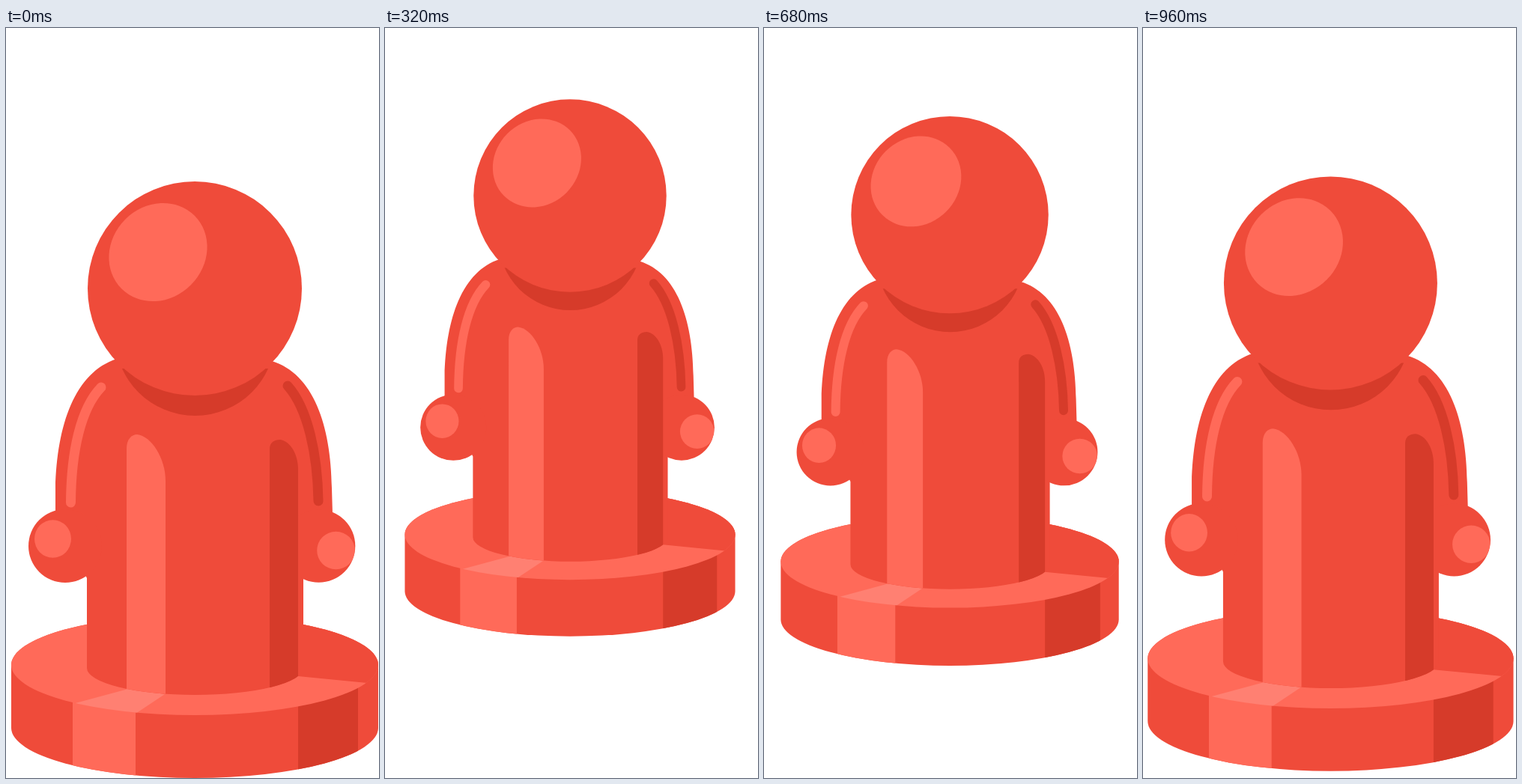
An HTML page with a canvas for the animation above (1000 ms loop, 498x1002 px).

```html
<!DOCTYPE html>
<html lang="en">
<head>
<meta charset="utf-8">
<title>Bouncing pawn</title>
<style>
  html, body { margin: 0; width: 100%; height: 100%; overflow: hidden; background: #fff; }
  canvas { display: block; width: 498px; height: 1002px; }
</style>
</head>
<body>
<canvas id="stage" width="498" height="1002"></canvas>
<script>
const ctx = document.getElementById('stage').getContext('2d');
const STEP = 40, LOOP = 1000;
const RED = '#ef4b3a', LIGHT = '#ff6a59', PALE = '#ff8072', DARK = '#d63b2a';

// The pawn scales about this far point as it hops.
const PIVOT = { x: 202, y: -890 };

// time, scale, x drift, y drift
const KEYS = [
  [0, 1, 0, 0],
  [240, 0.9244, 0, 0],
  [400, 0.8758, 0, -0.5],
  [440, 0.859, 0, -0.5],
  [520, 0.8815, 0, -0.5],
  [680, 0.921, 0, -0.6],
  [800, 0.9523, -0.6, -1.3],
  [960, 0.9965, -1.4, -2.7],
  [1000, 1, 0, 0]
];

function poseAt(time) {
  const i = KEYS.findIndex(key => key[0] > time);
  const a = KEYS[i - 1], b = KEYS[i];
  const u = (time - a[0]) / (b[0] - a[0]);
  return a.slice(1).map((v, n) => v + (b[n + 1] - v) * u);
}

function ellipse(x, y, rx, ry = rx, turn = 0) {
  const p = new Path2D();
  p.ellipse(x, y, rx, ry, turn, 0, Math.PI * 2);
  return p;
}

function rect(x, y, w, h) {
  const p = new Path2D();
  p.rect(x, y, w, h);
  return p;
}

function fill(color, path) {
  ctx.fillStyle = color;
  ctx.fill(path);
}

function line(color, path) {
  ctx.strokeStyle = color;
  ctx.lineWidth = 13;
  ctx.lineCap = 'round';
  ctx.stroke(path);
}

function clipped(path, draw) {
  ctx.save();
  ctx.clip(path);
  draw();
  ctx.restore();
}

const plateTop = ellipse(252, 851, 245, 67);
const plate = new Path2D('M7 851A245 67 0 0 1 497 851V935A245 67 0 0 1 7 935Z');
const body = new Path2D(
  'M66 650V615C68 530 92 460 148 442L355 445C410 462 434 530 435 615L436 650' +
  'L397 735V855A144.5 36 0 0 1 108 855V735Z');
const bodyLight = new Path2D('M161 900V562C161 549 168 543 175 543C194 545 213 575 213 605V900Z');
const bodyDark = new Path2D('M352 900V562C352 554 358 550 366 550C380 552 390 570 390 590V900Z');
const armLight = new Path2D('M86.5 634C87 565 100 508 127 480');
const armDark = new Path2D('M376 478C403 508 416 570 417 632');
const castShadow = new Path2D('M390 866L482 875L498 875V780H390Z');
const topGlint = new Path2D('M89 903L163 883L212 890L173 916V925H89Z');
const leftHand = ellipse(79, 692, 49);
const rightHand = ellipse(417.5, 692, 48.8);

function drawPlate() {
  fill(RED, plate);
  clipped(plate, () => {
    fill(LIGHT, rect(89, 851, 84, 160));
    fill(DARK, rect(390, 851, 80, 160));
  });
  fill(LIGHT, plateTop);
  clipped(plateTop, () => {
    fill(RED, castShadow);
    fill(PALE, topGlint);
  });
}

function drawBody() {
  [body, leftHand, rightHand].forEach(p => fill(RED, p));
  clipped(body, () => {
    fill(LIGHT, bodyLight);
    fill(DARK, bodyDark);
  });
  line(LIGHT, armLight);
  line(DARK, armDark);
  fill(LIGHT, ellipse(62.5, 682.5, 24.5, 25.3));
  clipped(rightHand, () => fill(LIGHT, ellipse(440.5, 698, 25.3)));
}

function drawHead() {
  clipped(rect(100, 455, 300, 80), () => fill(DARK, ellipse(252.5, 411, 107)));
  fill(RED, ellipse(252, 348, 143));
  fill(LIGHT, ellipse(203, 299.5, 69, 62, -Math.PI / 4));
}

function render(now) {
  const time = Math.floor((now % LOOP) / STEP) * STEP;
  const [scale, dx, dy] = poseAt(time);
  ctx.setTransform(1, 0, 0, 1, 0, 0);
  ctx.fillStyle = '#fff';
  ctx.fillRect(0, 0, 498, 1002);
  ctx.setTransform(scale, 0, 0, scale,
    PIVOT.x * (1 - scale) + dx, PIVOT.y * (1 - scale) + dy);
  drawPlate();
  drawBody();
  drawHead();
}

const start = performance.now();
function tick() {
  render(performance.now() - start);
  requestAnimationFrame(tick);
}
tick();
</script>
</body>
</html>
```
